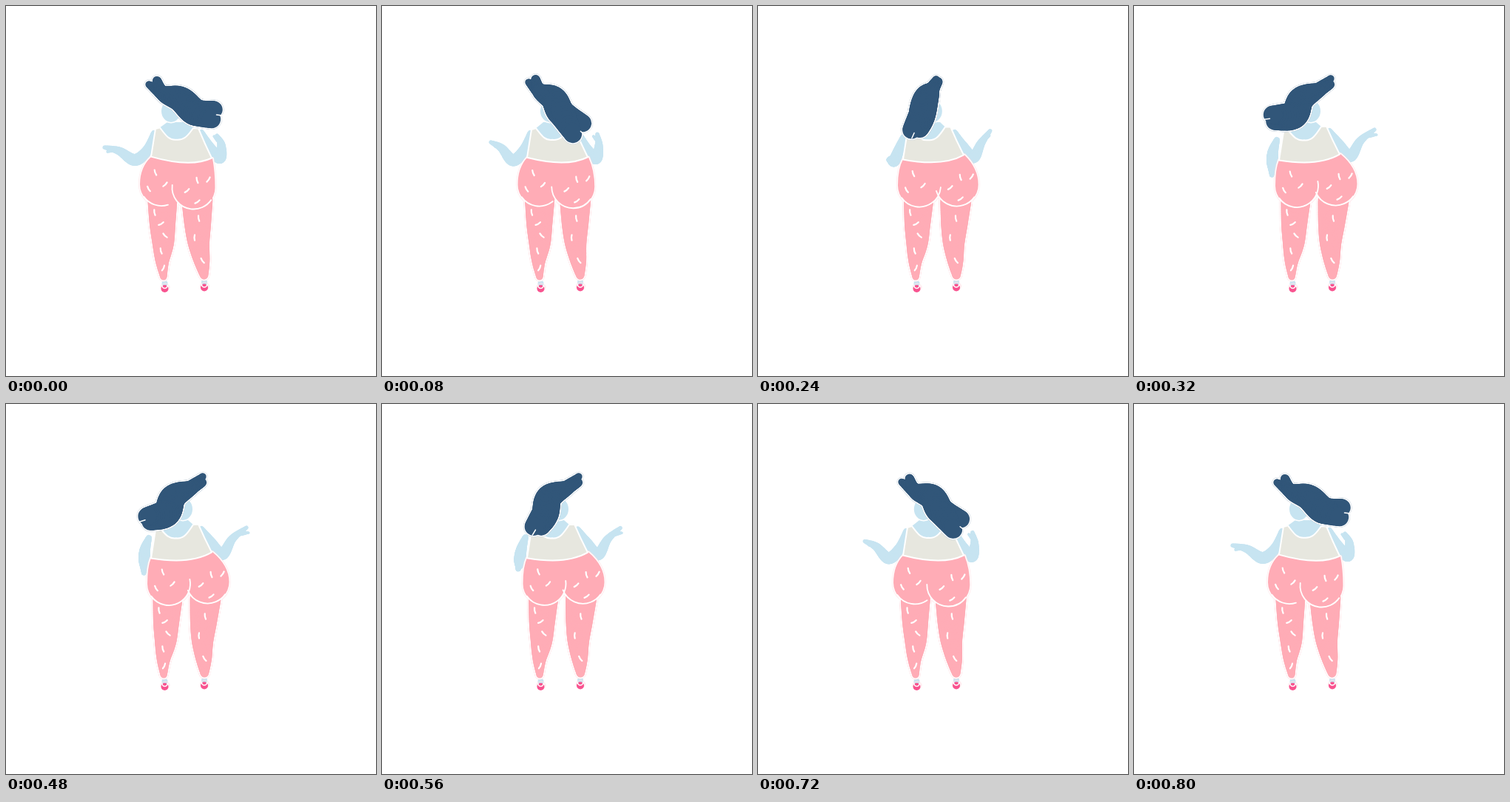
An HTML page with a canvas for the animation above (0.88 s loop, 500 by 500 pixels).

```html
<!DOCTYPE html>
<html lang="en">
<head>
<meta charset="utf-8">
<title>Dance</title>
<style>
html, body { margin: 0; width: 100%; height: 100%; overflow: hidden; background: #fff; }
canvas { display: block; width: 500px; height: 500px; }
</style>
</head>
<body>
<canvas id="stage" width="500" height="500"></canvas>
<script>
const STEP = 80, STEPS = 11;
const SKIN = '#c7e4f1', PINK = '#ffacb6', HAIR = '#315679', TOP = '#e7e7df', SHOE = '#f8538f';
const WHITE = '#fff', PINK_EDGE = '#ffe3e7', HAIR_EDGE = '#c9d3dc';

// Per step, from -1 (left) to 1 (right): body, face and hair ends.
const sway = [-1, -0.5, 0, 0.6, 1, 1, 1, 0.9, 0, -0.6, -1];
const turn = [-1, -0.5, 0, 0.6, 1, 1, 1, 1, -0.8, -0.9, -1];
const swing = [-1, -0.5, 0, 0.6, 1, 1, 0.93, 0.65, -0.28, -0.65, -1];

// Joints: radius, then the place when leaning left, upright and right.
const arm = {
  left: [
    [4, [200, 172], [201, 172], [193, 181]],
    [7, [191, 195], [193, 194], [188, 196]],
    [8, [174, 208], [180, 209], [187, 209]],
    [5.5, [153, 196], [170, 188], [187, 221]],
    [2.5, [133, 191], [161, 177], [186, 229]],
    [1.5, [137, 197], [169, 176], [187, 230]]
  ],
  right: [
    [4, [264, 171], [268, 174], [264, 169]],
    [7, [276, 192], [277, 194], [276, 186]],
    [8, [289, 205], [289, 207], [292, 203]],
    [5.5, [291, 188], [295, 190], [306, 182]],
    [2.5, [285, 175], [297, 171], [325, 167]],
    [1.5, [281, 176], [290, 176], [328, 174]]
  ]
};
const knot = [
  [4.5, [193, 106], [203, 100], [266, 98]],
  [6, [204, 101], [211, 97], [265, 106]],
  [10, [212, 118], [214, 112], [249, 114]],
  [17, [236, 126], [228, 125], [226, 126]]
];
const ends = [
  [18, [257, 144], [230, 147], [216, 148]],
  [11.5, [281, 140], [262, 152], [190, 156]],
  [12, [278, 153], [238, 168], [187, 147]]
];
const leg = {
  left: { lean: 3.5, foot: [214.5, 381], bones: [[215, 262, 20], [214, 294, 17.5], [214, 320, 14.5], [212, 345, 9], [213, 366, 4.5]] },
  right: { lean: 5.5, foot: [268, 379.5], bones: [[264, 262, 21], [263, 294, 18], [263, 320, 14.5], [266, 345, 10.5], [268, 364, 5.5]] }
};
const shirt = [[202, 168], [208, 166], [216, 176], [230, 181], [245, 176], [253, 164],
  [260, 164], [268, 183], [278, 203], [261, 212], [236, 215], [196, 206]];

// Sprinkles: x, y, angle; on the hips counted from each side's centre.
const sprinkles = {
  hipLeft: [[-8, -16, 70], [5, 0, -45], [-17, 6, 60]],
  hipRight: [[5, -10, 75], [20, -11, -55], [-9, 4, -40], [5, 19, -35]],
  left: [[204, 279, 80], [212, 294, -30], [217, 310, 45], [211, 331, 75], [213, 354, -65]],
  right: [[265, 287, 80], [258, 313, 90], [267, 344, 55]]
};

const ctx = document.getElementById('stage').getContext('2d');
ctx.lineCap = ctx.lineJoin = 'round';

const rad = deg => deg * Math.PI / 180;
const lerp = (a, b, u) => a + (b - a) * u;

function joint([r, left, mid, right], s) {
  const to = s < 0 ? left : right, u = Math.abs(s);
  return [lerp(mid[0], to[0], u), lerp(mid[1], to[1], u), r];
}

// Smooth interpolation between q and r.
function spline(p, q, r, s, u) {
  return q.map((v, i) => {
    const a = (r[i] - p[i]) / 2, b = (s[i] - v) / 2, d = r[i] - v;
    return v + u * (a + u * (3 * d - 2 * a - b + u * (a + b - 2 * d)));
  });
}

// Rounded limb of changing thickness.
function limb(bones, color, grow = 0) {
  const at = i => bones[Math.max(0, Math.min(bones.length - 1, i))];
  ctx.strokeStyle = color;
  let last = bones[0];
  for (let i = 0; i < bones.length - 1; i++) {
    for (let k = 1; k <= 12; k++) {
      const next = spline(at(i - 1), at(i), at(i + 1), at(i + 2), k / 12);
      ctx.lineWidth = 2 * ((last[2] + next[2]) / 2 + grow);
      ctx.beginPath();
      ctx.moveTo(last[0], last[1]);
      ctx.lineTo(next[0], next[1]);
      ctx.stroke();
      last = next;
    }
  }
}

function fill(path, color) {
  ctx.fillStyle = color;
  ctx.fill(path);
}
function stroke(path, color, width) {
  ctx.strokeStyle = color;
  ctx.lineWidth = width;
  ctx.stroke(path);
}
function oval(x, y, rx, ry, from = 0, to = 360, back = false) {
  const path = new Path2D();
  path.ellipse(x, y, rx, ry, 0, rad(from), rad(to), back);
  return path;
}

function drawArm(side, s) {
  const bones = arm[side].map(j => joint(j, s));
  const thumb = bones.pop();
  limb(bones, SKIN);
  const [wrist, tip] = bones.slice(-2);
  limb([wrist.map((v, i) => lerp(v, tip[i], 0.5)), thumb], SKIN);
}

function drawHead(face) {
  const head = oval(231 - 8 * -face, 142, 13, 15);
  stroke(head, WHITE, 3);
  fill(head, SKIN);
}

function drawShirt(s) {
  const p = shirt.map(([x, y]) => [x, y - s * (x - 236) * 0.06]);
  const path = new Path2D(), neck = new Path2D();
  const scoop = to => {
    to.moveTo(...p[1]);
    to.bezierCurveTo(...p[2], p[3][0] - 10, p[3][1] + 1, ...p[3]);
    to.bezierCurveTo(p[3][0] + 10, p[3][1] + 1, ...p[4], ...p[5]);
  };
  scoop(neck);
  neck.lineTo(246, 157);
  neck.lineTo(218, 157);
  scoop(path);
  path.lineTo(...p[6]);
  path.quadraticCurveTo(...p[7], ...p[8]);
  path.bezierCurveTo(...p[9], ...p[10], ...p[11]);
  path.lineTo(...p[0]);
  path.closePath();
  return { path, neck };
}

function drawFoot([x, y]) {
  fill(oval(x, y - 6, 4, 4), SKIN);
  stroke(oval(x + 0.5, y - 1, 6, 5), PINK_EDGE, 1);
  fill(oval(x, y + 1, 5, 5), SHOE);
  stroke(oval(x, y - 3, 3.5, 3.5, 0, 180), WHITE, 1.5);
}

function sprinkle(x, y, deg) {
  const c = Math.cos(rad(deg)) * 3.7, s = Math.sin(rad(deg)) * 3.7;
  const path = new Path2D();
  path.moveTo(x - c, y - s);
  path.quadraticCurveTo(x - s * 0.3, y + c * 0.3, x + c, y + s);
  stroke(path, WHITE, 2.2);
}

function drawPants(s) {
  const r = 29;
  const l = [215 + 5 * s, 242 + s], q = [263 + 9.5 * s, 243 - 2.5 * s];
  const hips = new Path2D();
  hips.moveTo(196, 206 + 2 * s);
  hips.quadraticCurveTo(l[0] - r, l[1] - 23, l[0] - r, l[1]);
  hips.arc(...l, r, Math.PI, 0, true);
  hips.arc(...q, r, Math.PI, 0, true);
  hips.quadraticCurveTo(q[0] + r, q[1] - 22, 279, 203 - 3 * s);
  hips.closePath();

  const shift = (y, lean) => s * lean * (370 - y) / 105;
  const legs = Object.values(leg).map(({ lean, bones }) =>
    bones.map(([x, y, w]) => [x + shift(y, lean), y, w]));
  for (const [color, grow] of [[PINK_EDGE, 2], [WHITE, 1.4], [PINK, 0]]) {
    for (const bones of legs) limb(bones, color, grow);
    if (grow) stroke(hips, color, grow * 2);
  }
  fill(hips, PINK);

  stroke(oval(...l, r, r, 145, 30 - 42 * s, true), WHITE, 1.8);
  stroke(oval(...q, r, r, 172 - 15 * s, 35, true), WHITE, 1.8);

  for (const [x, y, a] of sprinkles.hipLeft) sprinkle(l[0] + x, l[1] + y, a);
  for (const [x, y, a] of sprinkles.hipRight) sprinkle(q[0] + x, q[1] + y, a);
  for (const side of ['left', 'right'])
    for (const [x, y, a] of sprinkles[side]) sprinkle(x + shift(y, leg[side].lean), y, a);
}

function drawHair(face, flow) {
  const [a, b, nape, crown] = knot.map(j => joint(j, face));
  const drop = 50 * Math.abs(flow) * (1 - Math.abs(flow));
  const [mass, e, f] = ends.map((j, i) => {
    const [x, y, r] = joint(j, flow);
    return [x, y + (i ? drop : 0), r];
  });
  for (const [color, grow] of [[HAIR_EDGE, 1.9], [WHITE, 1.4], [HAIR, 0]])
    for (const lock of [[a, nape], [b, nape, crown, mass, e], [mass, f]]) limb(lock, color, grow);

  // Parting between the two ends.
  const x = (e[0] + f[0]) / 2, y = (e[1] + f[1]) / 2;
  const dir = Math.atan2(y - mass[1], x - mass[0]);
  const cut = new Path2D();
  cut.moveTo(x + 5 * Math.cos(dir), y + 5 * Math.sin(dir));
  cut.lineTo(x + 13 * Math.cos(dir), y + 13 * Math.sin(dir));
  stroke(cut, WHITE, 1.5);
}

function draw(step) {
  const s = sway[step];
  ctx.clearRect(0, 0, 500, 500);
  drawArm('left', s);
  drawArm('right', s);
  const { path, neck } = drawShirt(s);
  fill(neck, SKIN);
  drawHead(turn[step]);
  for (const side of Object.values(leg)) drawFoot(side.foot);
  drawPants(s);
  fill(path, TOP);
  stroke(path, WHITE, 2);
  drawHair(turn[step], swing[step]);
}

const start = performance.now();
let shown = -1;
function tick() {
  const step = Math.floor((performance.now() - start) / STEP) % STEPS;
  if (step !== shown) draw(shown = step);
  requestAnimationFrame(tick);
}
tick();
</script>
</body>
</html>
```
